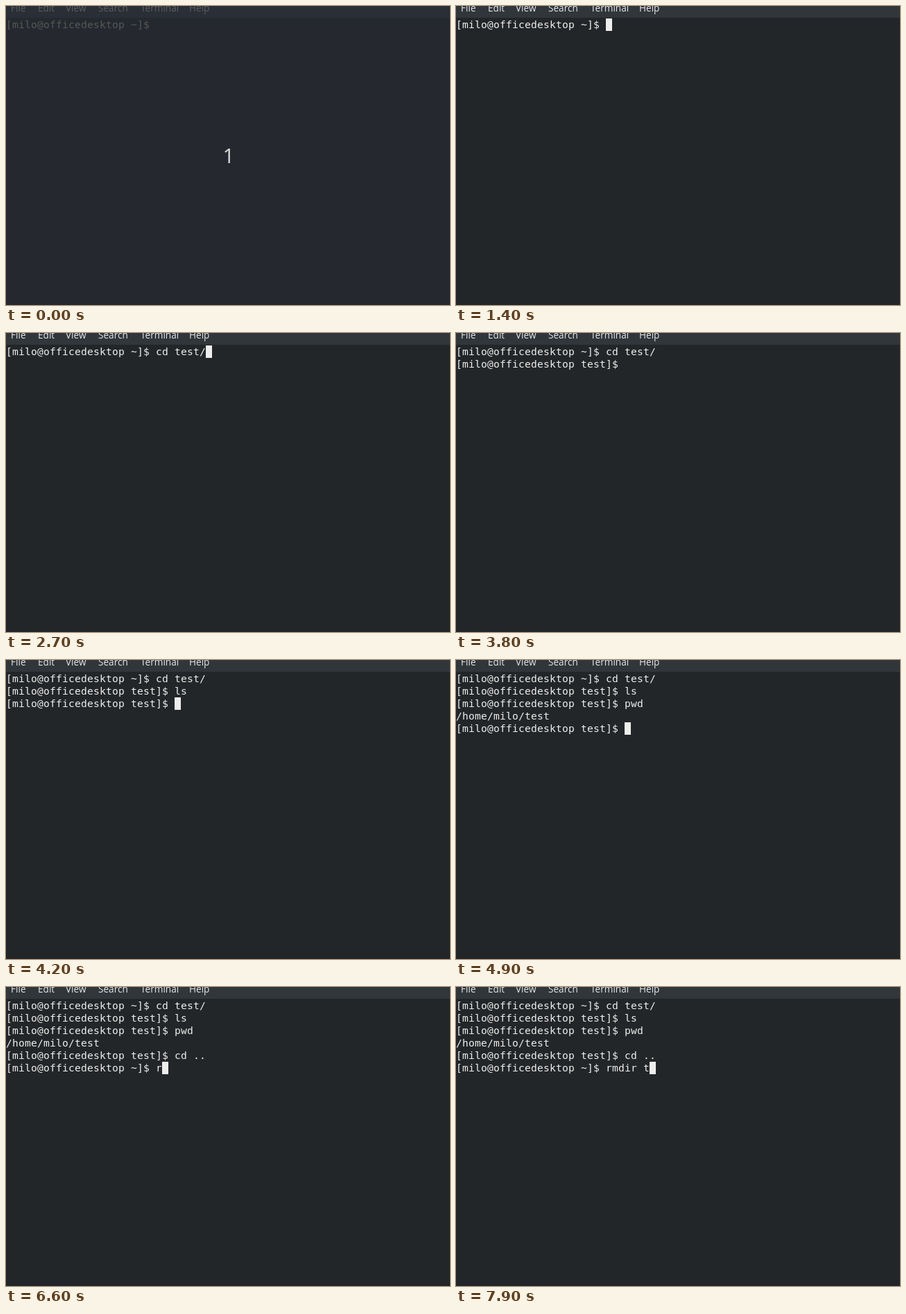
An HTML page with a canvas for the animation above (8 s loop, 640 px wide and 432 px high).

```html
<!DOCTYPE html>
<html lang="en">
<head>
<meta charset="utf-8">
<title>Terminal session</title>
<style>
  html, body { margin: 0; width: 100%; height: 100%; overflow: hidden; background: #232629; }
  canvas { display: block; }
</style>
</head>
<body>
<canvas id="stage" width="640" height="432"></canvas>
<script>
const ctx = document.getElementById('stage').getContext('2d');
const LOOP = 8000, CELL_W = 9, CELL_H = 18, TOP = 18;

const prompt = dir => `[milo@officedesktop ${dir}]$ `;
const home = prompt('~'), test = prompt('test');
const menu = [['File', 7], ['Edit', 46], ['View', 86], ['Search', 133], ['Terminal', 194], ['Help', 264]];

// What the terminal receives, and when
const output = [
  [0, home],
  [2000, 'c'], [2100, 'd'], [2200, ' '], [2400, 't'], [2500, 'e'], [2700, 'st/'],
  [3300, '\n' + test],
  [4000, 'l'], [4100, 's'], [4200, '\n' + test],
  [4700, 'pw'], [4800, 'd'], [4900, '\n/home/milo/test\n' + test],
  [5200, 'c'], [5400, 'd'], [5500, ' '], [5700, '.'], [5800, '.'],
  [6000, '\n' + home],
  [6600, 'r'], [6700, 'm'], [7000, 'd'], [7200, 'i'], [7300, 'r'], [7500, ' '], [7900, 't']
];
const cursorOff = [[0, 200], [800, 1400], [3800, 4000]];

const bright = { body: '#232629', bar: '#31363b', label: '#e6e7e8', text: '#eeeeec' };
const dimmed = { body: '#25292f', bar: '#2a2e36', label: '#5c5e62', text: '#565759' };

function drawMenu(theme) {
  ctx.fillStyle = theme.bar;
  ctx.fillRect(0, 0, 640, 17);
  ctx.fillStyle = theme.label;
  ctx.font = '13.6px "Open Sans", "Noto Sans", sans-serif';
  for (const [label, x] of menu) ctx.fillText(label, x, 8);
}

function drawTerminal(t, theme) {
  const lines = output.filter(([at]) => at <= t).map(([, s]) => s).join('').split('\n');
  ctx.fillStyle = theme.text;
  ctx.font = '14.667px "DejaVu Sans Mono", monospace';
  lines.forEach((line, row) => {
    [...line].forEach((ch, col) => ctx.fillText(ch, col * CELL_W, TOP + row * CELL_H + 14));
  });
  if (cursorOff.some(([from, to]) => t >= from && t < to)) return;
  const row = lines.length - 1;
  ctx.fillRect(lines[row].length * CELL_W, TOP + row * CELL_H, CELL_W, CELL_H);
}

function draw(t) {
  const counting = t < 200;
  const theme = counting ? dimmed : bright;
  ctx.fillStyle = theme.body;
  ctx.fillRect(0, 0, 640, 432);
  drawMenu(theme);
  drawTerminal(t, theme);
  if (counting) {
    ctx.fillStyle = '#dcdcdc';
    ctx.font = '29.5px "Open Sans", "Noto Sans", sans-serif';
    ctx.fillText('1', 312.5, 227);
  }
}

function tick() {
  draw(performance.now() % LOOP);
  requestAnimationFrame(tick);
}
tick();
</script>
</body>
</html>
```
